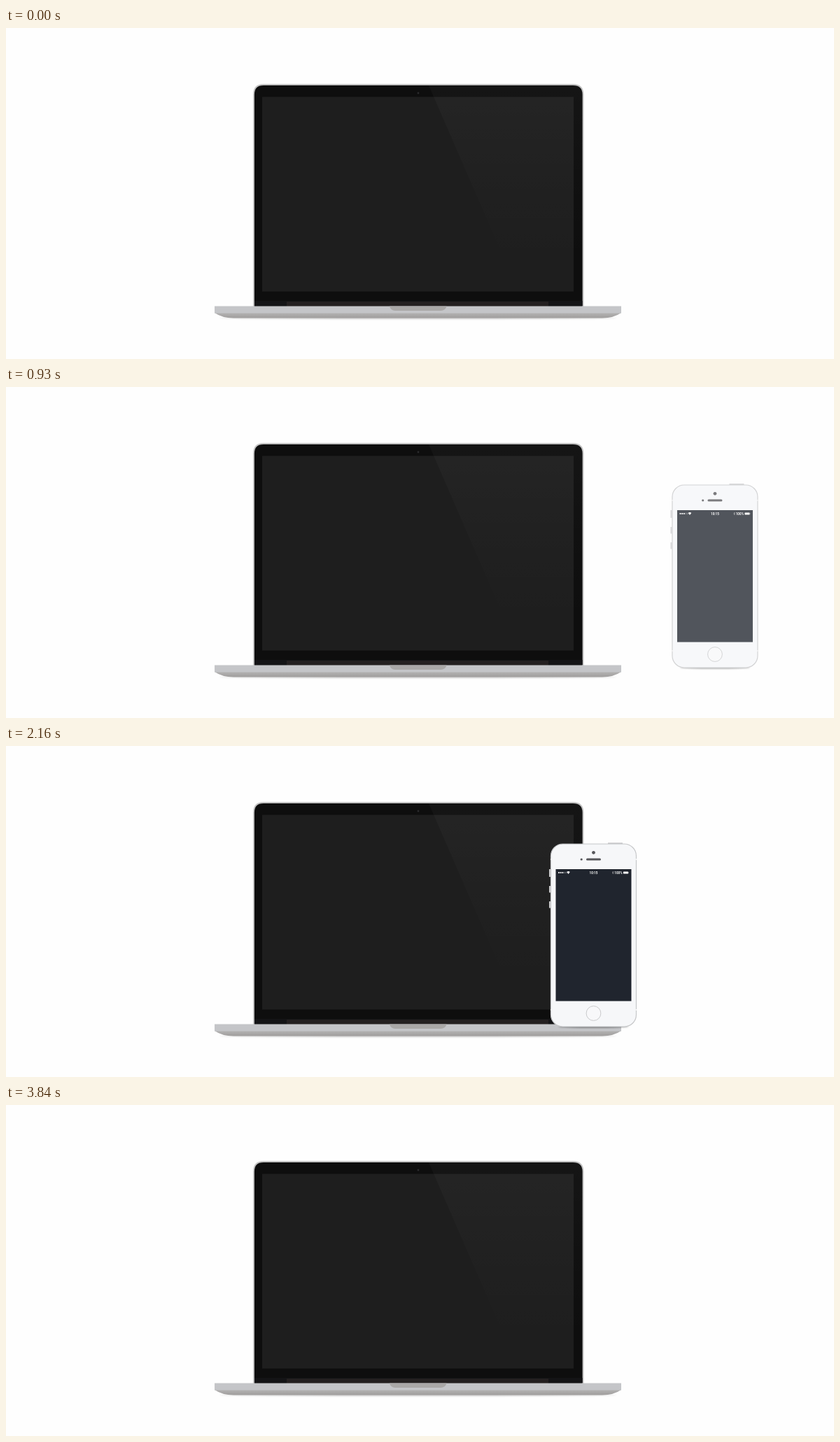
Animation, 1183 px wide and 473 px high, one loop 4.02 s. Source, as an HTML page:

```html
<!DOCTYPE html>
<html lang="en">
<head>
<meta charset="utf-8">
<title>Laptop and phone</title>
<style>
html, body { margin: 0; width: 100%; height: 100%; overflow: hidden; background: #fefefe; }
svg { display: block; width: 1183px; height: 473px; }
text { font: 600 4.6px Roboto, Arial, sans-serif; fill: #fff; }
</style>
</head>
<body>
<svg viewBox="0 0 1183 473">
  <defs>
    <linearGradient id="shine" x1="0" y1="0" x2="0" y2="1">
      <stop offset="0" stop-color="#fff" stop-opacity=".03"/>
      <stop offset=".55" stop-color="#fff" stop-opacity=".012"/>
      <stop offset="1" stop-color="#fff" stop-opacity="0"/>
    </linearGradient>
    <linearGradient id="lip" x1="0" y1="0" x2="0" y2="1">
      <stop offset="0" stop-color="#b4b3b3"/>
      <stop offset="1" stop-color="#9f9d9c"/>
    </linearGradient>
    <filter id="soft" x="-10%" y="-300%" width="120%" height="700%">
      <feGaussianBlur stdDeviation="1.3"/>
    </filter>
  </defs>

  <!-- laptop -->
  <ellipse cx="588.5" cy="414.5" rx="284" ry="1.5" opacity=".2" filter="url(#soft)"/>
  <path d="M354 398V95Q354 81 368 81H810Q824.5 81 824.5 95V398Z" fill="#0e0e0e" stroke="#c4c4c4" stroke-width="1.8"/>
  <path d="M355 390H823.5V398H355Z" fill="#141416"/>
  <path d="M401 391H775V398H401Z" fill="#242020"/>
  <path d="M366 98.5H811V376.5H366Z" fill="#1e1e1e"/>
  <path d="M604 82H810Q823.5 82 823.5 95V335H714Z" fill="url(#shine)"/>
  <circle cx="589" cy="93" r="1.4" fill="#2b2b2d"/>
  <path d="M298 407H879Q868 414.5 852 414.5H325Q309 414.5 298 407Z" fill="url(#lip)"/>
  <path d="M298 397.5H879V407.5H298Z" fill="#c4c5c8"/>
  <path d="M548 397.5H629.5Q628 404 621 404H556Q549.5 404 548 397.5Z" fill="#aaa8a7"/>

  <!-- phone, its left edge at x = 0 -->
  <g id="phone" opacity="0">
    <ellipse cx="61.5" cy="401" rx="50" ry="1.8" opacity=".4" filter="url(#soft)"/>
    <path d="M82 139H103M-1 176V187M-1 200V209.5M-1 222V231.5" stroke="#cfcfd1" stroke-width="2"/>
    <rect x=".5" y="140" width="122" height="261" rx="17" fill="#f6f7f9" stroke="#c6c7c9" stroke-width="1.2"/>
    <path d="M0 162H1.2M121.8 162H123M0 377H1.2M121.8 377H123" stroke="#f4f4f4" stroke-width="2"/>
    <g fill="#56565a">
      <circle cx="61.5" cy="152.3" r="2.4"/>
      <circle cx="44.2" cy="162" r="1.6"/>
      <rect x="51" y="160.4" width="21" height="3.1" rx="1.5"/>
    </g>
    <rect x="7.5" y="176" width="108" height="188.5" fill="#20252e"/>
    <g fill="#fff">
      <circle cx="12" cy="181" r="1.1"/>
      <circle cx="14.7" cy="181" r="1.1"/>
      <circle cx="17.4" cy="181" r="1.1"/>
      <path d="M23.2 180Q25.5 178.2 27.8 180L25.5 183Z"/>
      <rect x="104" y="179.5" width="7" height="3" rx=".6"/>
      <path d="M111.3 180.4H111.9V181.6H111.3Z"/>
    </g>
    <g fill="none" stroke="#fff" stroke-width=".4">
      <circle cx="20" cy="181" r=".8" opacity=".6"/>
      <circle cx="22.4" cy="181" r=".8" opacity=".6"/>
      <path d="M88.3 180L90 182L89.2 183V179L90 180L88.3 182" opacity=".7"/>
    </g>
    <text x="61.5" y="182.6" text-anchor="middle">10:15</text>
    <text x="102.6" y="182.6" text-anchor="end">100%</text>
    <circle cx="61.5" cy="382" r="10.4" fill="#f8f8fa" stroke="#c9cacc"/>
  </g>
</svg>
<script>
const LOOP = 4020, STEP = 30, SLIDE = 3150;
const START = 1013.5, TRAVEL = 305;
const FADE_IN = 1200, FADE_OUT_END = 3840, FADE_OUT = 630;
const phone = document.getElementById('phone');
const clamp = v => Math.max(0, Math.min(1, v));

// Sine ease in and out, slightly flattened in the middle
function ease(p) {
  return (1 - Math.cos(Math.PI * p)) / 2 + 0.0035 * Math.sin(2 * Math.PI * p);
}

function draw(now) {
  const t = Math.floor(now % LOOP / STEP) * STEP;
  const x = START - TRAVEL * ease(clamp(t / SLIDE));
  const alpha = Math.min(clamp(t / FADE_IN), clamp((FADE_OUT_END - t) / FADE_OUT));
  phone.setAttribute('transform', `translate(${x.toFixed(2)} 0)`);
  phone.setAttribute('opacity', alpha.toFixed(3));
}

let begin;
function tick(now) {
  begin ??= now;
  draw(now - begin);
  requestAnimationFrame(tick);
}
requestAnimationFrame(tick);
</script>
</body>
</html>
```
